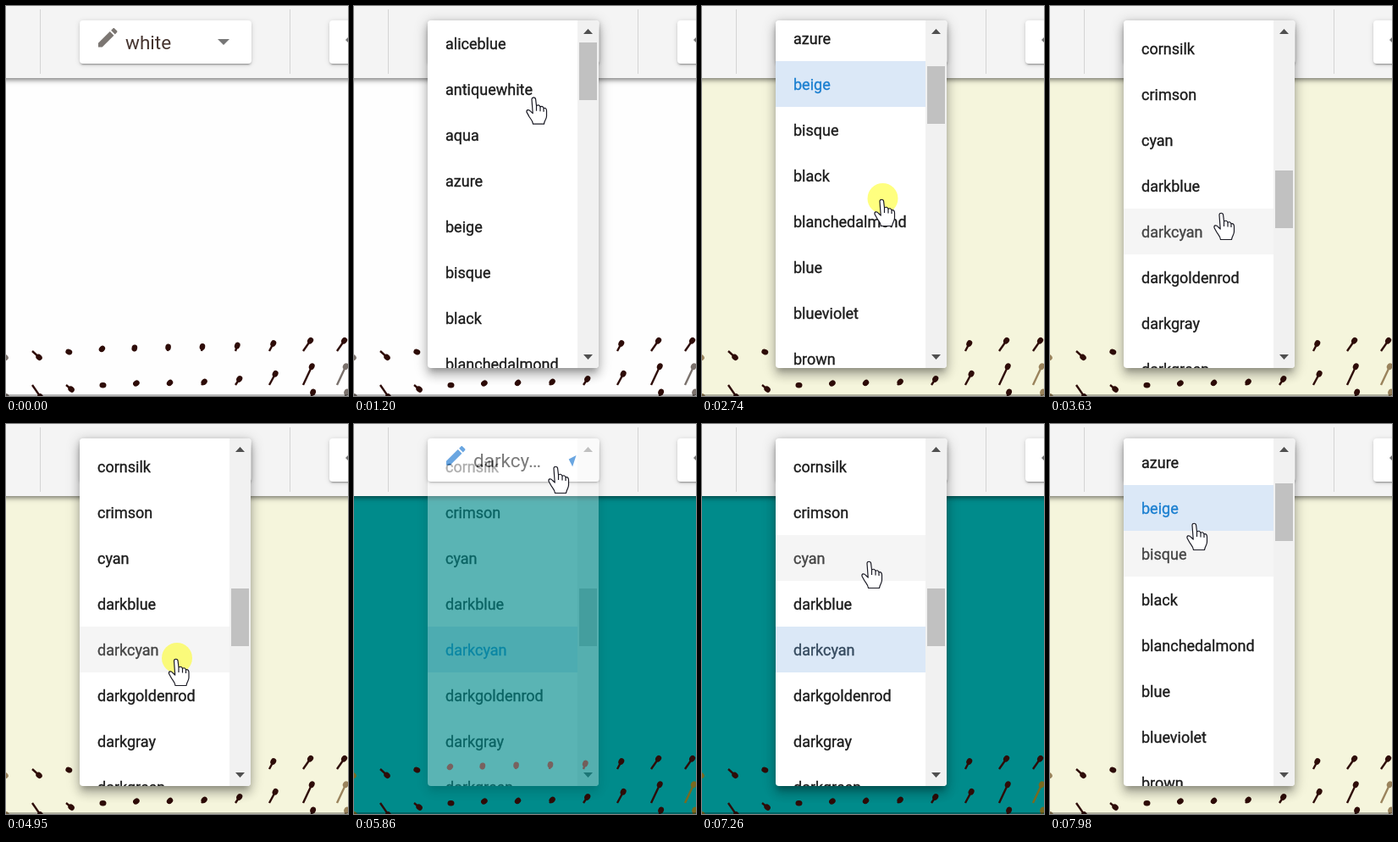
Animation, 404 px wide and 460 px high, one loop 8000 ms. Source, as an HTML page:

```html
<!DOCTYPE html>
<html lang="en">
<head>
<meta charset="utf-8">
<style>
html, body { margin: 0; width: 100%; height: 100%; overflow: hidden; }
body { position: relative; font-family: Roboto, sans-serif; }
div, svg { position: absolute; box-sizing: border-box; }
svg { left: 0; top: 0; width: 404px; height: 460px; overflow: hidden; }
#stage { left: 0; top: 0; width: 404px; height: 460px; overflow: hidden; }
#floor { left: 0; top: 458px; width: 404px; height: 2px; background: rgba(0,0,0,.28); }
#bar { left: -20px; top: -20px; width: 444px; height: 105px; background: #f4f4f4; box-shadow: 0 2px 6px rgba(0,0,0,.55); }
.rule { top: 4px; width: 1px; height: 76px; background: #d4d4d4; }
.card { top: 17px; width: 203px; height: 51px; border-radius: 4px; background: #fff;
  box-shadow: 0 3px 1px -2px rgba(0,0,0,.2), 0 2px 2px rgba(0,0,0,.14), 0 1px 6px rgba(0,0,0,.14); }
#label { left: 141px; top: 28px; font-size: 22.5px; line-height: 30px; }
#menu { left: 87px; top: 17px; width: 202px; height: 410px; border-radius: 4px; background: #fff;
  box-shadow: 0 6px 6px -3px rgba(0,0,0,.22), 0 9px 11px 1px rgba(0,0,0,.16), 0 3px 16px 2px rgba(0,0,0,.16); }
#clip { inset: 0; overflow: hidden; border-radius: 4px; }
#list { left: 0; top: 0; width: 177px; }
#list div { position: static; height: 54px; padding: 1px 0 0 21px; font-size: 18px; line-height: 54px; color: #1c1c1c;
  -webkit-text-stroke: .35px; }
#track { left: 177px; top: 0; width: 25px; height: 410px; background: #f1f1f1; }
#thumb { left: 2px; width: 21px; height: 68px; background: #c1c1c1; }
</style>
</head>
<body>
<div id="stage">
  <svg id="field"></svg>
  <div id="floor"></div>
  <div id="bar"></div>
  <div class="rule" style="left:40px"></div>
  <div class="rule" style="left:335px"></div>
  <div class="card" style="left:87px"></div>
  <div class="card" style="left:382px"></div>
  <svg>
    <path id="pencil" transform="translate(105.2 22.3) scale(1.25)" d="M3 17.25V21h3.75L17.81 9.94l-3.75-3.75zM20.71 7.04c.39-.39.39-1.02 0-1.41l-2.34-2.34c-.39-.39-1.02-.39-1.41 0l-1.83 1.83 3.75 3.75z"/>
    <path id="caret" d="M-7-3.5H7L0 3.5z"/>
    <path d="M404 37l-3 3 3 3z" fill="#777"/>
  </svg>
  <div id="label"></div>
  <div id="menu"><div id="clip">
    <div id="list"></div>
    <div id="track">
      <div id="thumb"></div>
      <svg><path d="M7 16l5.500-6 5.500 6zM7 394h11l-5.500 6z" fill="#505050"/></svg>
    </div>
  </div></div>
  <svg>
    <circle id="press" r="18" fill="#ff0" fill-opacity=".5"/>
    <path id="hand" fill="#fff" stroke="#1a1a24" stroke-width="1.200" stroke-linejoin="round"
      d="M-2 2.500C-2-.5 2.300-.5 2.600 2.500L3.500 10C6 8.500 7.500 9.500 8 11.500 10 10 11.500 11 12 13 14 12 15.500 13.500 15.500 16V22C15.500 26 13 27 12.500 31.500H-.5C-1 27-4 25-5.500 22L-8 17.500C-8.500 14.500-5.500 14-3.500 16.500L-.8 19ZM3.500 10V16M8 11.500V16.500M12 13V17"/>
  </svg>
</div>
<script>
const $ = id => document.getElementById(id);
const names = ('aliceblue antiquewhite aqua azure beige bisque black blanchedalmond blue blueviolet brown burlywood ' +
  'cadetblue chartreuse chocolate coral cornflowerblue cornsilk crimson cyan darkblue darkcyan darkgoldenrod darkgray ' +
  'darkgreen darkkhaki darkmagenta darkolivegreen darkorange darkorchid darkred darksalmon darkseagreen darkslateblue ' +
  'darkslategray darkturquoise darkviolet deeppink deepskyblue dimgray').split(' ');
$('list').innerHTML = names.map(n => `<div>${n}</div>`).join('');
const items = [...$('list').children];

// The field turns upward to the right and grows away from its calm middle column.
function vector(col, row) {
  const k = Math.max(-4, Math.min(4, col - 5));
  const dx = 1 + 4 * row + .6 * k * k * (1 - .3 * row);
  const dy = -8 + 3 * row + (.33 - .27 * row) * k * k - (.78 + .53 * row) * k * Math.abs(k);
  const len = Math.max(7, Math.hypot(dx, dy)), angle = Math.atan2(dy, dx) * 180 / Math.PI;
  const faded = col === 0 || (col === 10 && row > 0);
  return `<g class="${faded ? 'faded' : ''}" transform="translate(${40 * col - 9} ${407 + 40 * row}) rotate(${angle})">
    <path d="M0-1.200H${len - 3}V1.200H0Z"/><ellipse cx="${len - 3.5}" rx="4" ry="3.300"/></g>`;
}
for (let row = 0; row < 3; row++)
  for (let col = 0; col <= 10; col++) $('field').innerHTML += vector(col, row);
$('field').style.fill = '#2e0c08';
const faded = document.querySelectorAll('.faded');

const grounds = { white: ['#fefefe', '#7a716c'], beige: ['#f5f5dc', '#9a835c'], darkcyan: ['#008b8b', '#7a6a20'] };
const clicks = [680, 2570, 4950, 5570, 7760];
const choices = [[0, 'white'], [2620, 'beige'], [5040, 'darkcyan'], [7850, 'beige']];
const hovers = [[0, ''], [1800, 'cadetblue'], [2420, ''], [3630, 'darkcyan'], [5180, ''], [6600, 'cyan'], [7300, ''], [7700, 'bisque']];
// Start, duration, destination
const moves = [[100, 380, 212, 31], [1000, 470, 212, 228], [3040, 90, 202, 244], [3920, 90, 200.5, 277],
  [5180, 380, 238, 50], [6350, 430, 197, 162], [7300, 400, 170, 117]];

const smooth = u => u * u * (3 - 2 * u);
const ramp = (t, start, span) => Math.max(0, Math.min(1, (t - start) / span));
const latest = (steps, t) => steps.filter(s => s[0] <= t).pop()[1];
const opening = (t, span) => ramp(t, 830, span) - ramp(t, 5080, span) + ramp(t, 5800, span);
const scrolled = t => 589 * ramp(t, 1500, 480) - 557 * ramp(t, 2330, 230) + 880 * ramp(t, 2652, 568) - 751 * ramp(t, 7260, 440);
const cursor = t => moves.reduce(([x, y], [start, span, toX, toY]) => {
  const u = smooth(ramp(t, start, span));
  return [x + (toX - x) * u, y + (toY - y) * u];
}, [341, 470]);

function draw(now) {
  const t = Math.floor(now % 8000 / 10) * 10;
  const scroll = scrolled(t), [x, y] = cursor(t);
  const choice = latest(choices, t), hover = latest(hovers, t);
  const [ground, edge] = grounds[latest(choices, Math.max(0, t - 100))];

  $('stage').style.background = ground;
  faded.forEach(v => v.style.fill = edge);

  $('pencil').style.fill = t > 680 ? '#1976d2' : '#7b7672';
  $('caret').style.fill = t > 680 ? '#1976d2' : '#777';
  $('caret').setAttribute('transform', `translate(257 42.5) rotate(${180 * opening(t, 100)})`);
  $('label').textContent = choice === 'darkcyan' ? 'darkcy…' : choice;
  $('label').style.color = choice === 'white' ? '#45342f' : '#333';

  $('menu').style.opacity = opening(t, 170);
  $('list').style.transform = `translateY(${-Math.round(scroll)}px)`;
  $('thumb').style.top = 26 + Math.round(scroll * .1655) + 'px';
  items.forEach((item, i) => {
    const chosen = names[i] === choice, over = names[i] === hover;
    item.style.background = chosen ? '#dbe8f7' : over ? '#f5f5f5' : '';
    item.style.color = chosen ? (hover === 'cyan' ? '#34495e' : '#1b7fd0') : over && t > 3600 ? '#444' : '';
  });

  $('hand').setAttribute('transform', `translate(${x} ${y})`);
  $('press').setAttribute('transform', `translate(${x + 1.5} ${y - 1})`);
  $('press').style.display = clicks.some(c => t >= c && t < c + 180) ? '' : 'none';
}

function loop() {
  draw(performance.now());
  requestAnimationFrame(loop);
}
loop();
</script>
</body>
</html>
```
